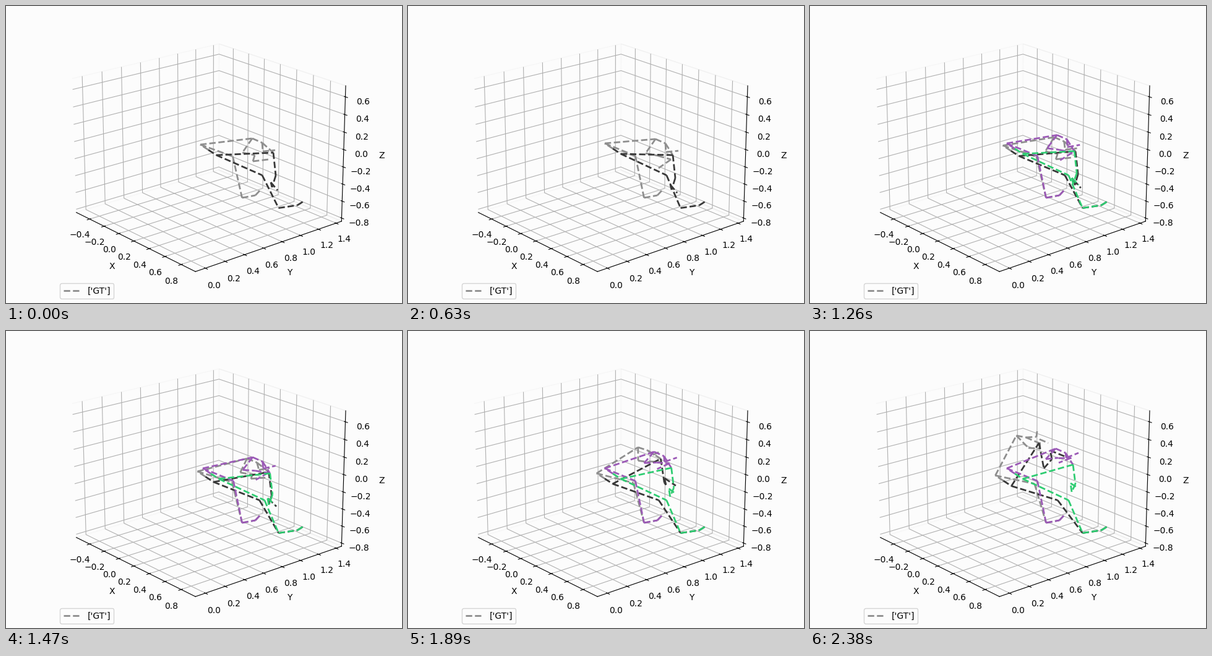
Recreate the animation shown at these times as a matplotlib script. Size 640x480 px, loop 2450 ms.

```python
import numpy as np
import matplotlib.pyplot as plt
from matplotlib.animation import FuncAnimation
from matplotlib.lines import Line2D

FRAMES, INTERVAL = 35, 70
FORECAST_START, LIFT_START, SWAY_END = 10, 15, 18
BACKGROUND = "#fcfcfc"

# Joints are complex screen points: x + y*1j, y down.
CROUCHED = {
    "l_hip": 318 + 222j, "l_shoulder": 400 + 215j, "neck": 416 + 222j,
    "head": 417 + 236j, "crown": 437 + 234j,
    "l_elbow": 384 + 238j, "l_wrist": 404 + 242j, "l_palm": 425 + 248j, "l_tip": 405 + 262j,
    "r_shoulder": 428 + 241j, "r_elbow": 432 + 278j, "r_wrist": 426 + 297j,
    "r_palm": 424 + 289j, "r_tip": 435 + 302j,
}
RISEN = {
    "l_hip": 299.5 + 233.5j, "l_shoulder": 333.5 + 169j, "neck": 349 + 172j,
    "head": 366 + 171j, "crown": 367 + 162j,
    "l_elbow": 353 + 189j, "l_wrist": 372 + 190j, "l_palm": 371 + 175j, "l_tip": 385 + 181j,
    "r_shoulder": 370 + 181j, "r_elbow": 378 + 222j, "r_wrist": 391 + 207j,
    "r_palm": 388 + 193j, "r_tip": 415 + 204j,
}
FEET = {
    "l_ankle": 381.5 + 310j, "l_foot": 403 + 306j, "l_toe": 410.5 + 298j,
    "r_ankle": 440.5 + 326.5j, "r_foot": 471 + 322j, "r_toe": 479.5 + 316.5j,
}
# Swing of single bones while the figure waits.
SWAY = {"l_hip": -4 + 2j, "l_shoulder": 2 - 3j, "r_shoulder": 8 - 6j,
        "l_palm": -24 + 4j, "l_tip": 45 - 17j}
HIP_SPAN = 26 + 17j


def limb(side, *parts):
    return [f"{side}_{part}" for part in parts]


LEGS = {s: ["root"] + limb(s, "hip", "knee", "ankle", "foot", "toe") for s in "lr"}
ARMS = {s: limb(s, "shoulder", "elbow", "wrist", "palm", "tip") for s in "lr"}
SPINE = ["l_hip", "l_shoulder", "neck", "head", "crown"]
SIDE = ["r_hip", "r_shoulder"]
LEFT_CHAINS = [LEGS["l"], SPINE, ["neck", "r_shoulder"], ARMS["l"]]
RIGHT_CHAINS = [LEGS["r"], SIDE, ARMS["r"]]
UPPER_BONES = [bone for chain in (SPINE, ARMS["l"], SIDE, ARMS["r"])
               for bone in zip(chain, chain[1:])]

for key_pose in (CROUCHED, RISEN):
    key_pose["r_hip"] = key_pose["l_hip"] + HIP_SPAN


def build_pose(hip, bone_vector):
    """Place the legs under the hip, then chain the upper body onto it."""
    shift = hip - (314 + 225j)
    joints = dict(FEET, l_hip=hip, r_hip=hip + HIP_SPAN, root=hip + HIP_SPAN / 2)
    joints["l_knee"] = 366.5 + 243.5j + complex(0.25 * shift.real, 0.4 * shift.imag)
    joints["r_knee"] = 414 + 273.5j + 0.95 * shift.real
    for a, b in UPPER_BONES:
        joints[b] = joints[a] + bone_vector(a, b)
    return joints


def true_pose(t):
    u = max(0, (t - LIFT_START) / (FRAMES - 1 - LIFT_START))
    lift = u ** 1.7
    sway = (1 + np.cos(2 * np.pi * min(t, SWAY_END) / SWAY_END)) / 2

    def bone_vector(a, b):
        low, high = CROUCHED[b] - CROUCHED[a], RISEN[b] - RISEN[a]
        low += sway * SWAY.get(b, 0)
        if a.endswith("hip"):
            return low * (high / low) ** lift  # turns about the hip
        return low + (high - low) * lift

    low_hip = CROUCHED["l_hip"] + sway * SWAY["l_hip"]
    return build_pose(low_hip + (RISEN["l_hip"] - low_hip) * u, bone_vector)


def forecast_pose(t):
    u = (t - FORECAST_START) / (FRAMES - 1 - FORECAST_START)
    ease = u * u * (3 - 2 * u)

    def bone_vector(a, b):
        rise = -3 - 25j if a.endswith("hip") else 0 if b == "neck" else -6j
        return CROUCHED[b] - CROUCHED[a] + ease * rise

    return build_pose(CROUCHED["l_hip"], bone_vector)


class Skeleton:
    def __init__(self, ax, pose, left_color, right_color):
        self.pose = pose
        self.bones = []
        for chains, color in ((LEFT_CHAINS, left_color), (RIGHT_CHAINS, right_color)):
            for chain in chains:
                for a, b in zip(chain, chain[1:]):
                    line, = ax.plot([], [], "--", lw=2, color=color)
                    self.bones.append((a, b, line))

    def show(self, t, visible=True):
        joints = self.pose(t) if visible else {}
        for a, b, line in self.bones:
            line.set_visible(visible)
            if visible:
                ends = np.array([joints[a], joints[b]])
                line.set_data(ends.real, ends.imag)


def build_space(fig):
    ax = fig.add_axes([0, 0, 1, 1], projection="3d", facecolor=BACKGROUND)
    ax.view_init(elev=20, azim=-40)
    half = 0.75 * 25 / 24
    for name, center in (("x", 0.192), ("y", 0.682), ("z", -0.057)):
        ax.set(**{f"{name}lim": (center - half, center + half),
                  f"{name}label": name.upper()})
    for axis in (ax.xaxis, ax.yaxis, ax.zaxis):
        axis.pane.fill = False
    key = Line2D([], [], ls="--", lw=2, color="#8e8e8e")
    ax.legend([key], ["['GT']"], loc="lower left", facecolor=BACKGROUND)


fig = plt.figure(figsize=(6.4, 4.8), dpi=100, facecolor=BACKGROUND)
build_space(fig)

stage = fig.add_axes([0, 0, 1, 1])
stage.set_axis_off()
truth = Skeleton(stage, true_pose, "#8e8e8e", "#383838")
forecast = Skeleton(stage, forecast_pose, "#9b59b6", "#2ecc71")
stage.set_xlim(0, 640)
stage.set_ylim(480, 0)


def draw(i):
    truth.show(i)
    forecast.show(i, i >= FORECAST_START)
    return []


anim = FuncAnimation(fig, draw, frames=FRAMES, interval=INTERVAL,
                     init_func=lambda: draw(0), repeat=True, repeat_delay=0)
plt.show()
```
